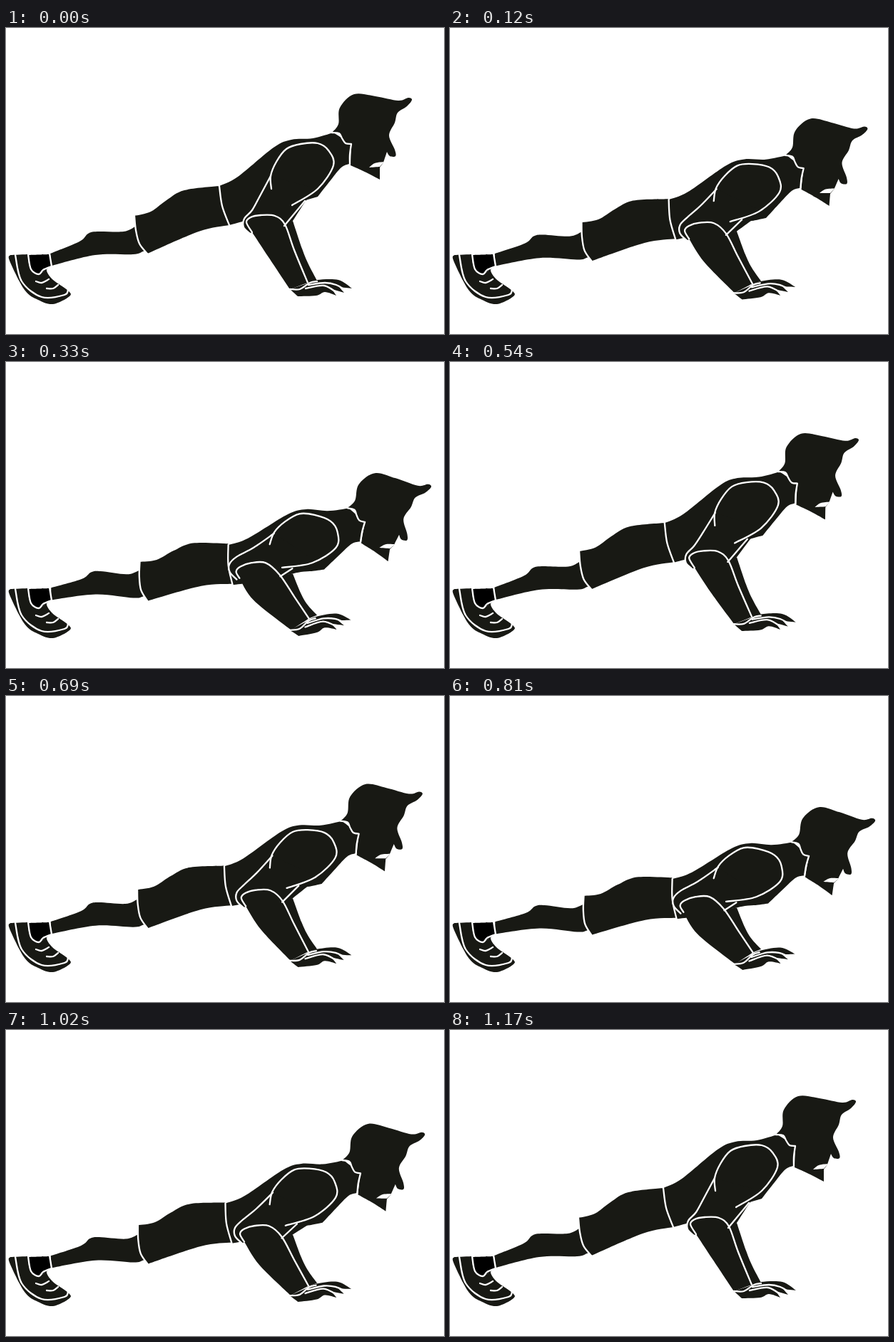
An HTML page for the animation above (1.2 s loop, 614 by 430 pixels).

```html
<!DOCTYPE html>
<html lang="en">
<head>
<meta charset="utf-8">
<title>Push-ups</title>
<style>
html, body { margin: 0; width: 100%; height: 100%; overflow: hidden; background: #fff; }
svg { display: block; width: 614px; height: 430px; }
.fill { fill: #181914; }
.sock { fill: #000; }
.white { fill: #fff; }
.line { fill: none; stroke: #fff; stroke-width: 2.3; stroke-linecap: round; stroke-linejoin: round; }
</style>
</head>
<body>
<svg viewBox="0 0 614 430" xmlns="http://www.w3.org/2000/svg">
  <g id="leg"></g>
  <g id="shorts"></g>
  <g id="torso"></g>
  <g id="shoe"></g>
  <g id="arm"></g>
  <g id="hand"></g>
  <g id="shoulder"></g>
</svg>
<script>
const STEP = 30, LOOP = 1200;
const $ = id => document.getElementById(id);

const parse = (text, size) => text.split('|').map(run => {
  const n = run.trim().split(/\s+/).map(Number);
  return Array.from({ length: n.length / size }, (_, i) => n.slice(i * size, (i + 1) * size));
});

// Smooth runs that meet at sharp corners.
function spline(runs) {
  let last = runs[0][0], d = 'M' + last;
  runs.forEach((run, r) => {
    const p = r ? [last, ...run] : run;
    for (let i = 0; i < p.length - 1; i++) {
      const a = p[i - 1] || p[i], b = p[i], c = p[i + 1], e = p[i + 2] || c;
      const h1 = b.map((v, k) => v + (c[k] - a[k]) / 6);
      const h2 = c.map((v, k) => v - (e[k] - b[k]) / 6);
      d += `C${h1} ${h2} ${c}`;
    }
    last = p[p.length - 1];
  });
  return d;
}

function add(group, cls, text) {
  const path = document.createElementNS('http://www.w3.org/2000/svg', 'path');
  path.setAttribute('class', cls);
  if (text) path.setAttribute('d', spline(parse(text, 2)));
  $(group).appendChild(path);
  return path;
}

// Body, in the raised pose
const hem = '198 317|187 303 182 284 180 264';
const waist = '313 277 303 250 299 222';
const collar = '457 147 467 148 471 155 476 162 484 163';

add('leg', 'fill', '62 317 103 300 115 289 128 286 165 286 181 279|205 308|192 314 178 318 125 319 64 334');
add('shorts', 'fill', hem + '|203 258 225 242 250 228 299 222|320 250|313 277|270 286 198 317');
add('shorts', 'line', hem);
add('torso', 'fill', waist + '|325 209 375 168 400 157 430 155 459 147|484 163|481 191|470 196 455 214 437 237|420 242|350 255|335 271|313 277');
add('torso', 'fill', collar + '|483 193|505 203 524 213|524 196|529 189|534 174|538 180 546 180 545 171 537 151 545 133 549 119 562 110 569 101 564 98 550 102 518 96 488 93 468 112 466 135 457 147');
add('torso', 'white', '509 196 517 190 530 188|524 195|509 196');
add('torso', 'line', waist);
add('torso', 'line', collar + '|482 178 482 192');

// Planted foot
add('shoe', 'fill', '6 319|32 318|33 334 46 345 62 335|57 341 66 354 87 369 89 377 66 388 45 382 26 368 5 327 6 319');
add('shoe', 'sock', '31 319|61 318|64 334|47 345 36 340 31 319');
add('shoe', 'line', '13 319 22 356 50 378 82 375 87 367');
add('shoe', 'line', '31 318 35 339 46 346 52 340 64 335|61 317');
add('shoe', 'line', '42 356 50 358 60 353');
add('shoe', 'line', '57 366 66 366 73 361');

// Hand and shoulder turn as rigid pieces
add('hand', 'fill', '422 359|436 354 466 354 485 366|467 364|474 372|457 367|463 376|447 371 435 376 409 377|398 367');
add('hand', 'line', '398 367 412 367 426 358 436 356');
add('hand', 'line', '424 361 447 358 463 361 477 369');
add('hand', 'line', '420 366 446 362 465 373');
add('shoulder', 'line', '372 226 371 208 379 188 393 170 413 163 437 162 452 172 459 193 437 226 401 249');

// Arm joints: x, y and the shift over the descent
const elbow = '371 208 6 41 356 236 -11 31 345 256 -27 22 334 268 -26 20 333 280 -24 19 341 288 -22 22';
const cuff = '345 287 -22 21 337 273 -18 27 343 266 -18 27 357 263 -16 24 377 264 -16 23 391 276 -9 29 404 312 0 22 423 358 2 3';
const gap = '419 243 -22 59 390 278 -7 29';
const back = '402 271 0 33 415 310 -2 19 424 332 -2 11 436 355 0 1';

const limbs = [
  ['fill', elbow + '|390 278 -7 29|402 271 0 33|420 243 6 62|437 226 3 71'],
  ['fill', back + '|422 360 2 1|385 275 0 31'],
  ['fill', cuff + '|398 367 2 12|368 322 -26 16 345 287 -22 21'],
  ['line', elbow], ['line', gap], ['line', cuff]
].map(([cls, text]) => ({ path: add('arm', cls), joints: parse(text, 4) }));

// Two linear repetitions: 9 steps down and 10 up, then 10 down and 10 up.
function depth(n) {
  if (n < 9) return n / 9;
  return Math.max(0, 1 - Math.abs(n < 19 ? n - 9 : n - 29) / 10);
}

function draw(ms) {
  const d = depth(Math.floor((ms % LOOP) / STEP));
  const turn = (id, angle, x, y, dy = 0) =>
    $(id).setAttribute('transform', `translate(${dy * d / 11} ${dy * d}) rotate(${angle * d} ${x} ${y})`);
  turn('leg', 8.2, 60, 328);
  turn('shorts', 9.7, 60, 328);
  turn('torso', 10.2, 60, 328);
  turn('hand', -11, 462, 373);
  turn('shoulder', 29.5, 415, 200, 62);
  for (const { path, joints } of limbs) {
    path.setAttribute('d', spline(joints.map(run =>
      run.map(([x, y, dx, dy]) => [x + dx * d, y + dy * d]))));
  }
}

const start = performance.now();
function tick() {
  draw(performance.now() - start);
  requestAnimationFrame(tick);
}
draw(0);
requestAnimationFrame(tick);
</script>
</body>
</html>
```
